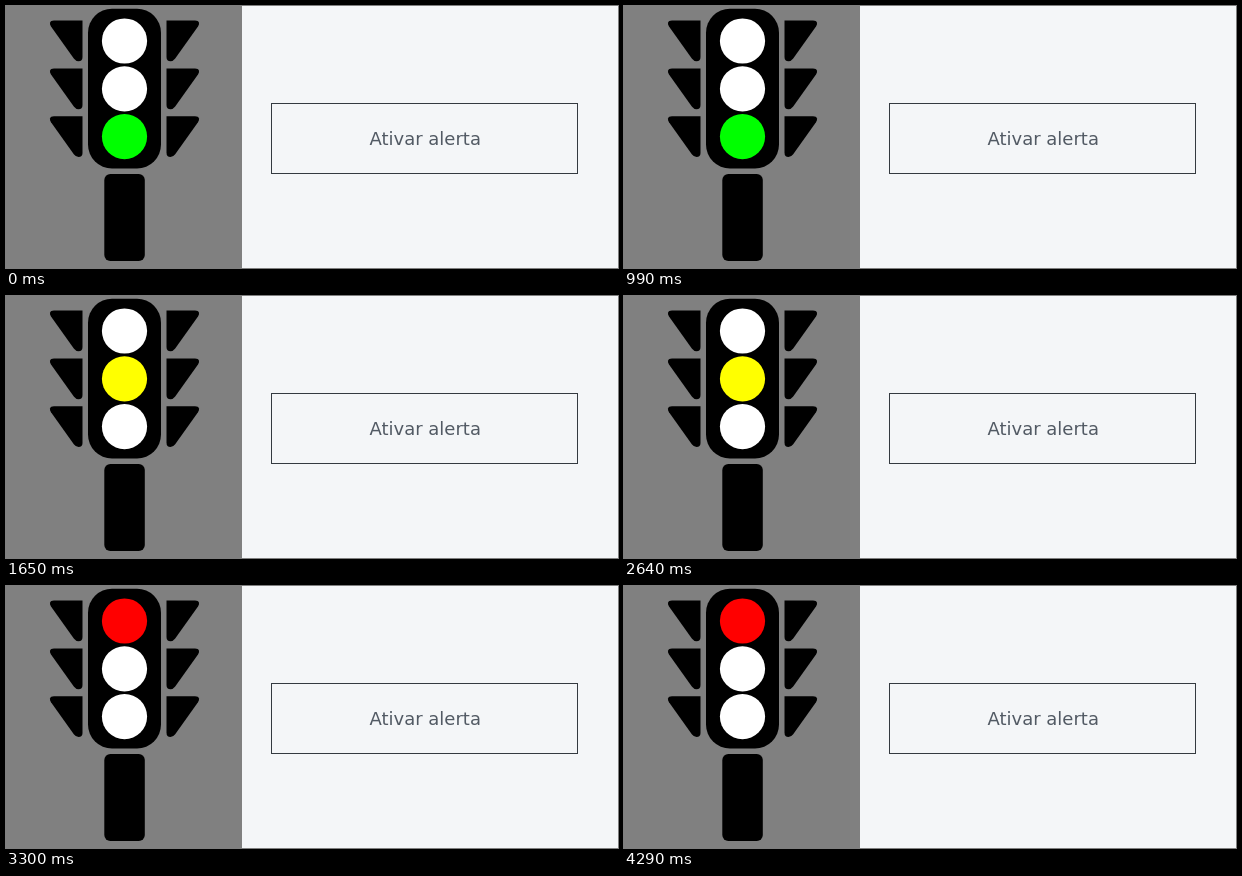
An HTML page that plays this animation: 612 px wide and 262 px high, repeating every 4.95 s.

```html
<!DOCTYPE html>
<html lang="pt">
<head>
<meta charset="utf-8">
<title>Semáforo</title>
<style>
  html, body { margin: 0; width: 100%; height: 100%; overflow: hidden; background: #f4f6f8; }
  svg { display: block; }
  text { font: 18px "DejaVu Sans", sans-serif; fill: #525a64; text-anchor: middle; }
</style>
</head>
<body>
<svg width="612" height="262" viewBox="0 0 612 262">
  <defs>
    <path id="fin" d="M48 14.5H76.5V51Q76.5 55.3 72.5 55.3Q69.8 55.3 67.8 52.6L45 20.5Q43.6 18.4 44 16.8Q44.6 14.5 48 14.5Z"/>
    <g id="fins">
      <use href="#fin"/>
      <use href="#fin" y="48"/>
      <use href="#fin" y="95.7"/>
    </g>
  </defs>
  <rect width="612" height="262" fill="#f4f6f8"/>
  <rect width="236" height="262" fill="#808080"/>
  <use href="#fins"/>
  <use href="#fins" transform="matrix(-1 0 0 1 237 0)"/>
  <rect x="82" y="2.7" width="73" height="159.8" rx="24"/>
  <rect x="98.3" y="168" width="40.5" height="87" rx="6"/>
  <g id="lamps">
    <circle cx="118.5" cy="35" r="22.6"/>
    <circle cx="118.5" cy="82.8" r="22.6"/>
    <circle cx="118.5" cy="130.6" r="22.6"/>
  </g>
  <rect x="265.5" y="97.5" width="306" height="70" fill="none" stroke="#343a40"/>
  <text x="419.2" y="139">Ativar alerta</text>
</svg>
<script>
  const STEP = 1650;
  const colors = ["#f00", "#ff0", "#0f0"];
  const lamps = document.querySelectorAll("#lamps circle");

  function draw(ms) {
    const lit = 2 - Math.floor(ms / STEP) % 3;
    lamps.forEach((lamp, i) => lamp.setAttribute("fill", i === lit ? colors[i] : "#fff"));
  }

  let start = null;
  function tick(now) {
    start ??= now;
    draw(Math.max(0, now - start));
    requestAnimationFrame(tick);
  }
  draw(0);
  requestAnimationFrame(tick);
</script>
</body>
</html>
```
